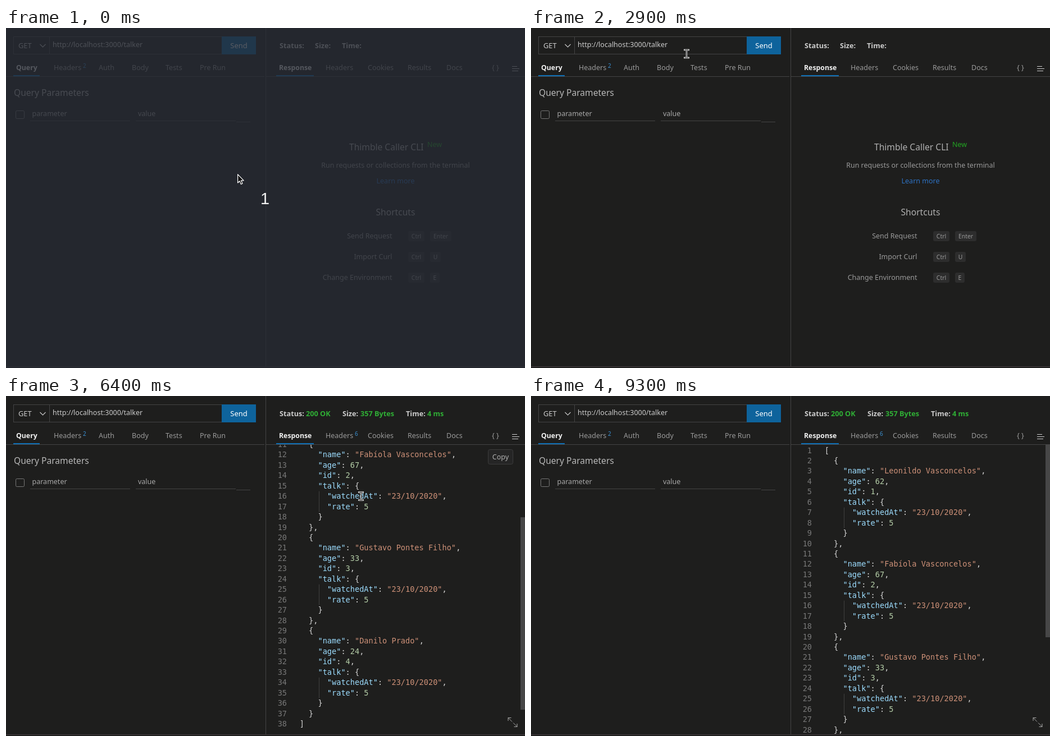
These frames come from a looping animation (924x606 px, 9.6 s). An HTML page with a canvas:

```html
<!DOCTYPE html>
<html lang="en">
<head>
<meta charset="utf-8">
<title>Request client</title>
<style>
  html, body { margin: 0; width: 100%; height: 100%; overflow: hidden; background: #1e1e1d; }
  canvas { display: block; }
</style>
</head>
<body>
<canvas id="stage" width="924" height="606"></canvas>
<script>
const ctx = document.getElementById('stage').getContext('2d');
const LOOP = 9600, STEP = 100;
const UI = '"Noto Sans", "Open Sans", sans-serif';
const MONO = '"DejaVu Sans Mono", monospace';
const BG = '#1e1e1d', LINE = '#444444', BLUE = '#0e639c';
const KEY = '#9cdcfe', STR = '#ce9178', NUM = '#b5cea8', PUNCT = '#d4d4d4';
const ROW = 18.445, COL = 8.19, CODE_X = 522.7, CODE_Y = 101.5;
const VIEW = { x: 463, y: 87, w: 461, h: 516 };

// Pointer path: time, x, y
const path = [
  [700, 412, 260], [1000, 380, 205], [1300, 310, 110], [1500, 268, 55], [1700, 251, 33.5],
  [1800, 251, 33.5], [1900, 251, 30.5], [2100, 251, 30.5], [2200, 258, 42], [2300, 262, 66],
  [2400, 260, 84], [2500, 250, 74], [2600, 240, 56], [2700, 237, 46], [2800, 237, 46],
  [2900, 277, 46], [3200, 350, 55], [3400, 394, 45], [3600, 408, 35], [4200, 408, 35],
  [4500, 402, 53], [4700, 450, 82], [4900, 560, 135], [5100, 628, 172], [5300, 632, 178.5],
  [8700, 632, 178.5], [8900, 470, 128], [9200, 40, 4]
];

// Scroll offset: time, pixels
const scrolls = [
  [0, 0], [5500, 65], [5900, 123], [6000, 130], [6300, 180], [6400, 195], [6700, 260],
  [7400, 200], [7500, 173], [7900, 110], [8000, 87], [8300, 0]
];

const people = [
  ['Leonildo Vasconcelos', 62], ['Fabíola Vasconcelos', 67],
  ['Gustavo Pontes Filho', 33], ['Danilo Prado', 24]
];

function buildCode() {
  const rows = [];
  const add = (col, ...parts) => rows.push({ col, parts });
  const field = (col, key, value, color, end) =>
    add(col, ['"' + key + '"', KEY], [': ', PUNCT], [value, color], [end, PUNCT]);
  add(0, ['[', PUNCT]);
  people.forEach(([name, age], i) => {
    add(2, ['{', PUNCT]);
    field(4, 'name', '"' + name + '"', STR, ',');
    field(4, 'age', String(age), NUM, ',');
    field(4, 'id', String(i + 1), NUM, ',');
    field(4, 'talk', '{', PUNCT, '');
    field(6, 'watchedAt', '"23/10/2020"', STR, ',');
    field(6, 'rate', '5', NUM, '');
    add(4, ['}', PUNCT]);
    add(2, [i < people.length - 1 ? '},' : '}', PUNCT]);
  });
  add(0, [']', PUNCT]);
  return rows;
}
const code = buildCode();

function text(str, x, y, color, size = 12.5, weight = 400, align = 'left', family = UI) {
  ctx.font = `${weight} ${size}px ${family}`;
  ctx.textAlign = align;
  ctx.fillStyle = color;
  ctx.fillText(str, x, y);
}

function rect(x, y, w, h, color) {
  ctx.fillStyle = color;
  ctx.fillRect(x, y, w, h);
}

function box(x, y, w, h, r, fill, stroke) {
  ctx.beginPath();
  ctx.roundRect(x, y, w, h, r);
  if (fill) { ctx.fillStyle = fill; ctx.fill(); }
  if (stroke) { ctx.strokeStyle = stroke; ctx.lineWidth = 1; ctx.stroke(); }
}

function poly(points, color, width = 1) {
  ctx.beginPath();
  points.forEach(([x, y]) => ctx.lineTo(x, y));
  ctx.strokeStyle = color;
  ctx.lineWidth = width;
  ctx.stroke();
}

function tabs(list, active) {
  list.forEach(([label, x]) => {
    const on = label === active;
    text(label, x, 75, on ? '#f0f0f0' : '#9a9a9a', on ? 12.3 : 12.5, on ? 600 : 400);
  });
}

function drawRequest(hover) {
  rect(13, 15, 372, 32, LINE);
  rect(14, 16, 63, 30, BG);
  rect(78, 16, 306, 30, BG);
  text('GET', 22, 36, '#cccccc', 12.8);
  poly([[60.5, 29], [65.5, 34], [70.5, 29]], '#cccccc', 1.1);
  text('http://localhost:3000/talker', 83, 34, '#cccccc');
  rect(384, 15, 61, 32, hover ? '#1177bb' : BLUE);
  text('Send', 414.5, 36, '#ffffff', 13, 500, 'center');

  rect(0, 86, 460, 1, LINE);
  tabs([['Query', 18], ['Headers', 85], ['Auth', 165], ['Body', 224], ['Tests', 284], ['Pre Run', 345]], 'Query');
  text('2', 137, 71, '#3a8fd0', 10);
  rect(13, 84, 47, 2, '#0f6fb5');

  text('Query Parameters', 14, 121, '#b8b8b8', 15.6);
  box(17.5, 147.5, 15, 14, 2, null, '#777777');
  text('parameter', 46.5, 157, '#a8a8a8');
  text('value', 235, 157, '#a8a8a8');
  rect(43, 165, 178, 1, LINE);
  rect(231, 165, 178, 1, LINE);
  rect(410, 167, 25, 1, LINE);
}

function drawStatus(done) {
  const items = done
    ? [['Status:', 487, '200 OK', 534], ['Size:', 599, '357 Bytes', 631], ['Time:', 712, '4 ms', 750]]
    : [['Status:', 487], ['Size:', 550], ['Time:', 598]];
  items.forEach(([label, x, value, vx]) => {
    text(label, x, 35.5, '#cccccc', 12.7, 700);
    if (value) text(value, vx, 35.5, '#2faf35', 12.7, 700);
  });
  rect(463, 86, 461, 1, LINE);
  tabs([['Response', 486], ['Headers', 569], ['Cookies', 644], ['Results', 715], ['Docs', 784], ['{ }', 865]], 'Response');
  if (done) text('6', 621, 71, '#3a8fd0', 10);
  rect(481, 84, 67, 2, '#0f6fb5');
  rect(901, 68, 9, 1, '#cccccc');
  rect(901, 72, 13, 1, '#cccccc');
  rect(901, 76, 11, 1, '#cccccc');
}

function drawWelcome() {
  const mid = 693.5;
  text('Thimble Caller CLI', 611, 218, '#b0b0b0', 15.6);
  text('New', 750, 212, '#22a522', 12.5);
  text('Run requests or collections from the terminal', mid, 249, '#9a9a9a', 12.45, 400, 'center');
  text('Learn more', mid, 276.5, '#2d72c4', 12.5, 400, 'center');
  text('Shortcuts', mid, 334, '#b0b0b0', 15.6, 400, 'center');
  [['Send Request', 'Enter', 38], ['Import Curl', 'U', 19], ['Change Environment', 'E', 17]].forEach(([label, key, w], i) => {
    const y = 375 + i * 37;
    text(label, 687.5, y, '#9a9a9a', 12.5, 400, 'right');
    box(716, y - 13, 29, 18, 3, '#2d2d2d');
    text('Ctrl', 730.5, y, '#9a9a9a', 10.4, 400, 'center');
    box(755, y - 13, w, 18, 3, '#2d2d2d');
    text(key, 755 + w / 2, y, '#9a9a9a', 10.4, 400, 'center');
  });
}

function drawCode(scroll, over) {
  ctx.save();
  ctx.beginPath();
  ctx.rect(VIEW.x, VIEW.y, VIEW.w, VIEW.h);
  ctx.clip();
  code.forEach(({ col, parts }, i) => {
    const y = CODE_Y + i * ROW - scroll;
    if (y < VIEW.y - 5 || y > VIEW.y + VIEW.h + 15) return;
    text(String(i + 1), 500, y, '#787878', 13.6, 400, 'right', MONO);
    if (col === 6) rect(557, y - 13.5, 1, ROW, '#404040');
    let x = CODE_X + col * COL;
    parts.forEach(([str, color]) => {
      text(str, x, y, color, 13.6, 400, 'left', MONO);
      x += str.length * COL;
    });
  });
  rect(916, VIEW.y + scroll / 1.51, 8, 343, '#474747');
  ctx.restore();

  const arrow = '#a8a8a8';
  poly([[894, 579], [894, 573.5], [899.5, 573.5]], arrow);
  poly([[894, 573.5], [901, 580.5]], arrow);
  poly([[910, 584], [910, 589.5], [904.5, 589.5]], arrow);
  poly([[910, 589.5], [903, 582.5]], arrow);
  if (over) {
    box(858.5, 95.5, 44, 26, 3, '#252525', '#3c3c3c');
    text('Copy', 880.5, 113, '#b0b0b0', 12.5, 400, 'center');
  }
}

function outline(shape) {
  const p = new Path2D(shape);
  ctx.lineJoin = 'round';
  ctx.fillStyle = '#111111';
  ctx.strokeStyle = '#ffffff';
  ctx.lineWidth = 1.2;
  ctx.fill(p);
  ctx.stroke(p);
}

function drawPointer(kind, x, y) {
  ctx.save();
  ctx.translate(x, y);
  if (kind === 'arrow') {
    outline('M.6 .8V16L4 12.8 6.4 18.4 9 17.3 6.6 11.8H11.2Z');
  } else if (kind === 'hand') {
    outline('M-1.5 1Q0-1 1.5 1V7Q4 6 4.5 8 7 7 7.5 9 10 8.5 10 11V14L8 18H0L-5 11Q-5 8-1.5 11Z');
  } else {
    const beam = [[-3.5, -7], [-.2, -6.5], [0, -6], [0, 6], [-.2, 6.5], [-3.5, 7]];
    const caps = [[[-3.5, -7], [3.5, -7]], [[-3.5, 7], [3.5, 7]], beam.slice(2, 4)];
    caps.forEach(c => { ctx.lineCap = 'square'; poly(c, '#ffffff', 2.6); });
    caps.forEach(c => { ctx.lineCap = 'butt'; poly(c, '#111111', 1); });
  }
  ctx.restore();
}

function pointerAt(t) {
  if (t <= path[0][0]) return path[0].slice(1);
  const i = path.findIndex(p => p[0] >= t);
  if (i < 0) return null;
  const [t0, x0, y0] = path[i - 1], [t1, x1, y1] = path[i];
  const k = (t - t0) / (t1 - t0);
  return [x0 + (x1 - x0) * k, y0 + (y1 - y0) * k];
}

function kindAt([x, y], done) {
  const inBar = y > 15 && y < 47.5;
  if (inBar && x > 384 && x < 445) return 'hand';
  if (inBar && x > 78 && x <= 384) return 'beam';
  return done && x > 500 && y > 87 ? 'beam' : 'arrow';
}

function draw(time) {
  const t = Math.min(Math.floor((time % LOOP) / STEP) * STEP, 9300);
  const done = t >= 4200;
  const pos = pointerAt(t);
  const kind = pos && kindAt(pos, done);
  const scroll = scrolls.filter(s => s[0] <= t).pop()[1];

  rect(0, 0, 924, 606, BG);
  rect(462, 0, 1, 603, LINE);
  rect(0, 603, 924, 1, '#463e41');
  drawRequest(kind === 'hand');
  drawStatus(done);
  if (done) drawCode(scroll, pos && pos[0] > 463 && pos[1] > 87);
  else drawWelcome();

  if (t < 100) {
    rect(0, 0, 924, 606, 'rgba(38,42,51,0.77)');
    text('1', 453, 314, '#f2f2f2', 29, 400, 'left', '"Liberation Sans", sans-serif');
  }
  if (pos) drawPointer(kind, ...pos);
}

const start = performance.now();
function tick() {
  draw(performance.now() - start);
  requestAnimationFrame(tick);
}
tick();
</script>
</body>
</html>
```
